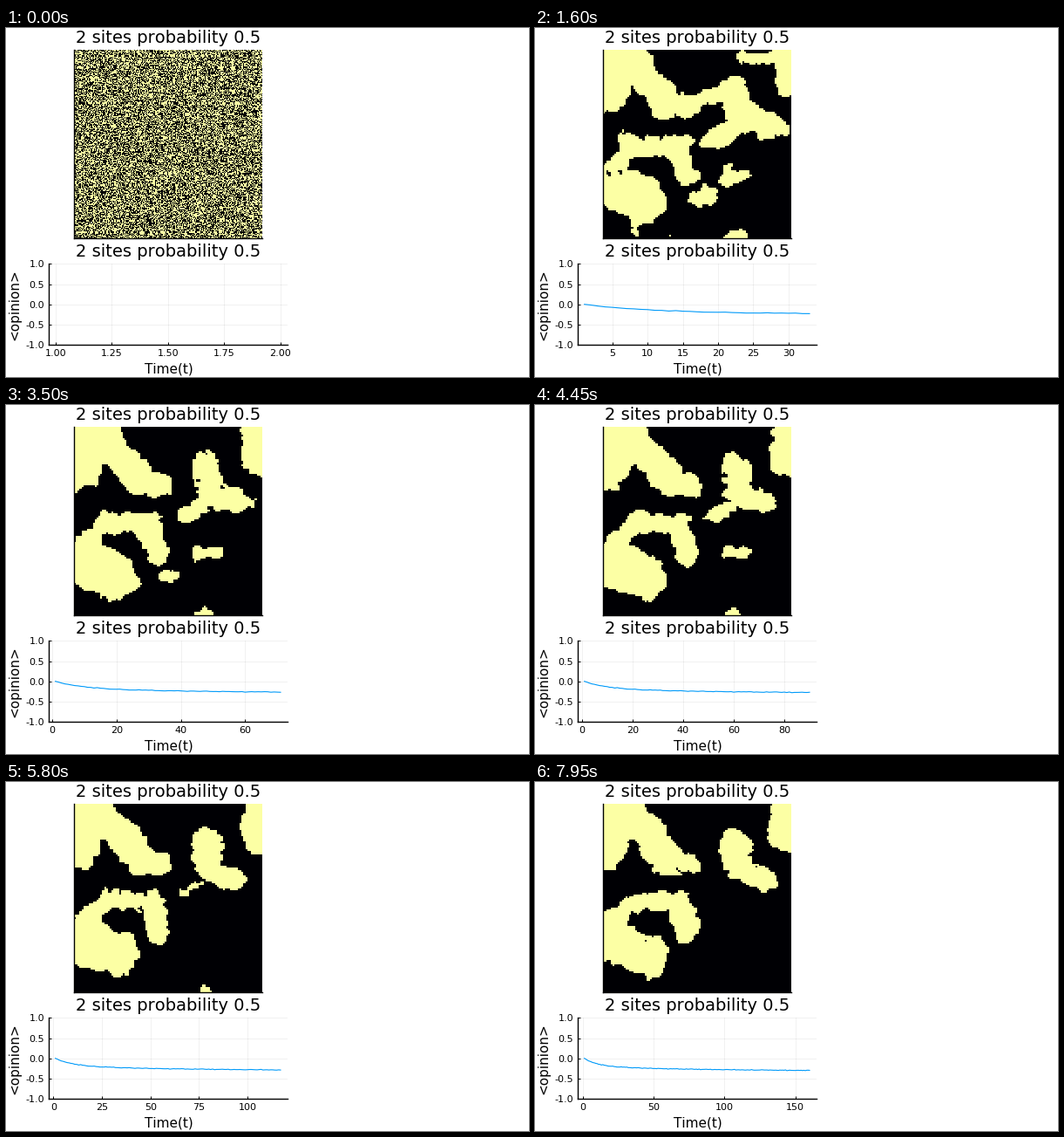
These frames come from a looping animation (600x400 px, 8000 ms). A matplotlib script:

```python
import numpy as np
import matplotlib.pyplot as plt
from matplotlib.animation import FuncAnimation
from matplotlib.colors import ListedColormap

plt.rcParams["font.family"] = "DejaVu Sans"
plt.rcParams["text.kerning_factor"] = 6
W, H, DPI = 600, 400, 100
FRAMES, STEP_MS = 160, 50
X0, Y0, SIDE = 78, 25, 216       # lattice box in pixels
N = 100                          # blocks per side, each of 2 x 2 sites
FORMED = 17                      # frame at which the noise has become clusters
rng = np.random.default_rng(12)

# Clusters as thick strokes: x1, y1, x2, y2, half width
LASTING = [
    (78, 20, 84, 72, 26), (102, 25, 152, 88, 19), (165, 93, 178, 91, 11),
    (230, 70, 234, 98, 16), (234, 102, 264, 112, 13), (296, 25, 294, 60, 22),
    (84, 180, 126, 197, 25), (90, 160, 116, 136, 12), (116, 136, 164, 134, 11),
    (164, 134, 174, 170, 13),
]
# The same, followed by the frame at which the cluster has shrunk away
FADING = [
    (218, 170, 240, 169, 13, 110), (205, 125, 225, 116, 13, 120),
    (182, 198, 196, 194, 13, 85), (230, 241, 234, 241, 13, 150),
    (250, 92, 286, 118, 12, 95), (194, 80, 224, 76, 12, 62),
    (240, 34, 284, 34, 13, 42),
]

cell = (np.arange(N) + 0.5) * SIDE / N
GX, GY = np.meshgrid(X0 + cell, Y0 + cell)


def stroke_distance(x1, y1, x2, y2):
    dx, dy = x2 - x1, y2 - y1
    u = np.clip(((GX - x1) * dx + (GY - y1) * dy) / (dx * dx + dy * dy), 0, 1)
    return np.hypot(GX - x1 - u * dx, GY - y1 - u * dy)


core = np.max([r - stroke_distance(*ends) for *ends, r in LASTING], axis=0)
shrinking = [(stroke_distance(*ends), r, life) for *ends, r, life in FADING]

freq = np.fft.fftfreq(N)
F2 = freq[:, None] ** 2 + freq ** 2


def blur(a, sigma):
    out = np.fft.ifft2(np.fft.fft2(a) * np.exp(-2 * (np.pi * sigma) ** 2 * F2)).real
    return out / out.std()


def drifting(sigma, hold):
    """Smooth noise that turns into new noise every `hold` frames."""
    stages = [blur(rng.standard_normal((N, N)), sigma) for _ in range(FRAMES // hold + 2)]

    def at(n):
        k, part = divmod(n, hold)
        a = part / hold * np.pi / 2
        return stages[k] * np.cos(a) + stages[k + 1] * np.sin(a)
    return at


SPIN = rng.choice([0, 1], (2 * N, 2 * N))
MIX = rng.standard_normal((N, N))
edge = drifting(1.0, 5)
bend = drifting(3.0, 60)


def lattice(n):
    if n == 0:
        return SPIN
    guide = core
    for dist, r, life in shrinking:
        if n < life:
            guide = np.maximum(guide, r * np.sqrt(1 - n / life) - dist)
    unrest = np.exp(-max(n - FORMED, 0) / 20)
    field = np.clip(guide, -9, 9) + 1.5 * edge(n) + (2 + 2.5 * unrest) * bend(n)
    w = min(n / FORMED, 1)
    field = w * field / 6 + (1 - w) * blur(MIX, 0.4 + 0.4 * np.sqrt(n))
    return np.kron(field > 0, np.ones((2, 2)))


# Mean opinion over time: a quick drop, then a slow one
TIME = np.arange(1, FRAMES + 1)
OPINION = -0.19 * (1 - np.exp((1 - TIME) / 9)) - 0.12 * (1 - np.exp((1 - TIME) / 70))
OPINION[1:] += rng.normal(0, 0.004, FRAMES - 1)


def nice_ticks(lo, hi):
    """Pick four to eight round ticks, weighing count, cover and roundness."""
    best, pick = -1, None
    for z in range(-2, 3):
        for q, nice in ((1, 1), (5, .9), (2, .7), (2.5, .5), (3, .2)):
            step = q * 10.0 ** z
            first, last = np.ceil(lo / step - 1e-9), np.floor(hi / step + 1e-9)
            count = int(last - first) + 1
            if not 4 <= count <= 8:
                continue
            grain = 1 - abs(count - 5) / 5
            cover = 1.5 * (hi - lo) / ((count - 1) * step)
            score = grain / 4 + cover / 3 + nice / 4 - count * 1e-6
            if score > best:
                best, pick = score, (first + np.arange(count)) * step
    step = pick[1] - pick[0]
    digits = next(d for d in range(4) if abs(step * 10 ** d - round(step * 10 ** d)) < 1e-6)
    return pick, [f"{v:.{digits}f}" for v in pick]


fig = plt.figure(figsize=(W / DPI, H / DPI), dpi=DPI, facecolor="white")


def box(x0, y0, x1, y1):
    ax = fig.add_axes([x0 / W, 1 - y1 / H, (x1 - x0) / W, (y1 - y0) / H])
    ax.patch.set_visible(False)
    for side in ("top", "right"):
        ax.spines[side].set_visible(False)
    for side in ("left", "bottom"):
        ax.spines[side].set_linewidth(1)
    return ax


def label(x, y, s, size, **kw):
    fig.text(x / W, 1 - y / H, s, fontsize=size, ha="center", va="baseline", **kw)


top = box(X0, Y0, X0 + SIDE, Y0 + SIDE)
top.set_xticks([])
top.set_yticks([])
image = top.imshow(lattice(0), cmap=ListedColormap(["#000004", "#fcffa4"]), vmin=0, vmax=1,
                   interpolation="nearest", aspect="auto")

low = box(48.9, 270.4, 322.7, 363)
low.set_ylim(-1, 1)
levels = np.linspace(-1, 1, 5)
low.set_yticks(levels, [f"{v:.1f}" for v in levels])
low.tick_params(direction="in", length=2.5, width=0.7, labelsize=8, pad=3.5)
low.grid(color="black", alpha=0.1, linewidth=0.4)
low.set_axisbelow(True)
curve, = low.plot([], [], color="#009af9", linewidth=0.8)

for y in (17, 262):
    label(186.5, y, "2 sites probability 0.5", 14)
label(186.5, 396, "Time(t)", 11)
label(14, 316.7, "<opinion>", 11, rotation=90, rotation_mode="anchor")


def draw(n):
    image.set_data(lattice(n))
    curve.set_data(TIME[:n + 1], OPINION[:n + 1])
    end = max(n + 1, 2)
    pad = 0.03 * (end - 1)
    low.set_xlim(1 - pad, end + pad)
    low.set_xticks(*nice_ticks(1 - pad, end + pad))
    return image, curve


anim = FuncAnimation(fig, draw, frames=FRAMES, interval=STEP_MS, repeat=True,
                     repeat_delay=0, blit=False)
plt.show()
```
